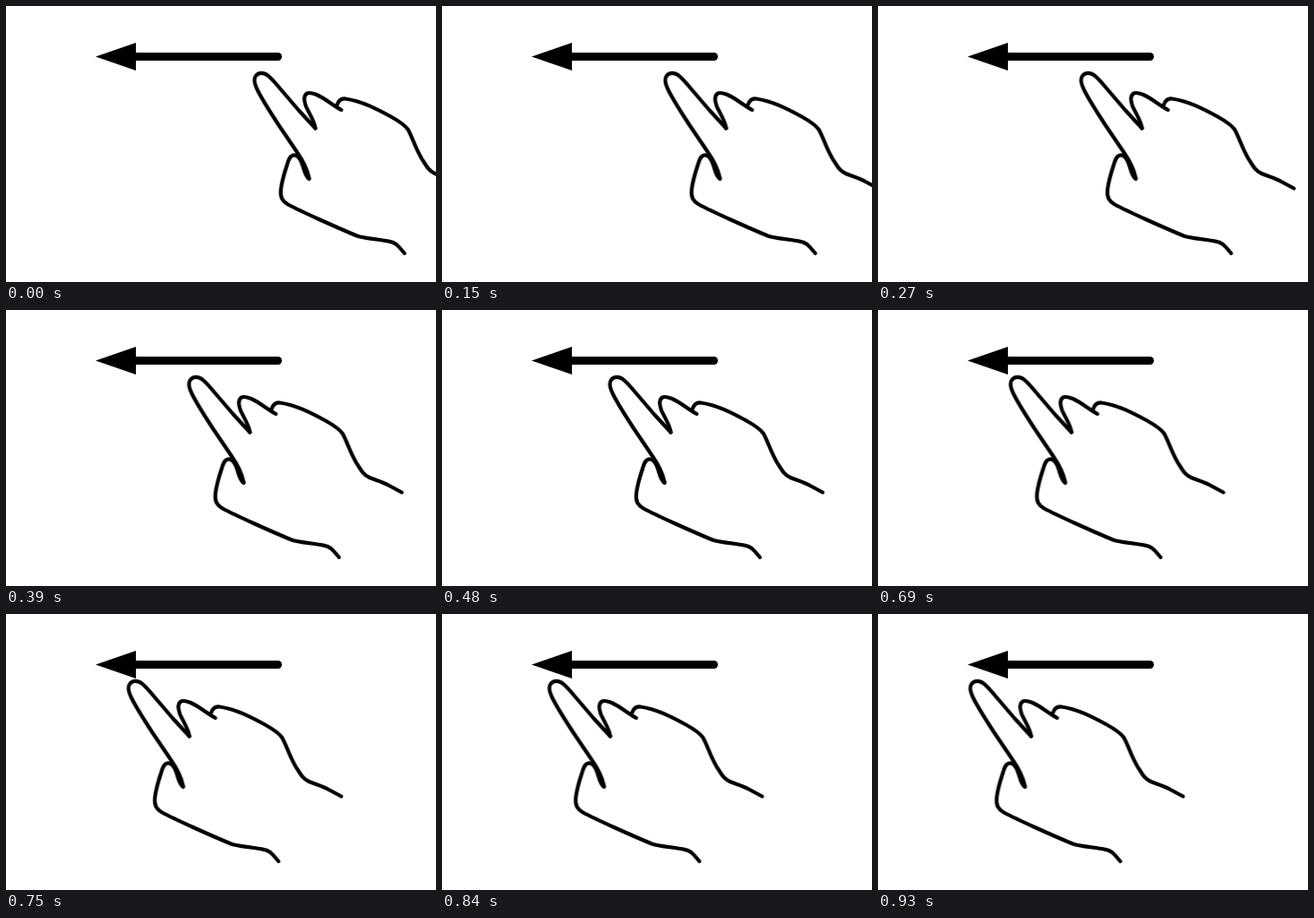
Write an HTML page that moves like this. It is 480 px wide and 308 px high and loops after 1030 ms.

```html
<!DOCTYPE html>
<html lang="en">
<head>
<meta charset="utf-8">
<title>Swipe left</title>
<style>
  html, body { margin: 0; width: 100%; height: 100%; overflow: hidden; background: #fff; }
  svg { display: block; width: 100%; height: 100%; }
  .bar { stroke: #000; stroke-width: 9; stroke-linecap: round; }
  .hand { fill: none; stroke: #000; stroke-width: 4.2; stroke-linecap: round; stroke-linejoin: round; }
</style>
</head>
<body>
<svg viewBox="0 0 480 308">
  <path d="M100 56.5L145 41V72Z"/>
  <path class="bar" d="M140 56.5H303.5"/>
  <g class="hand" id="hand">
    <!-- index finger -->
    <path d="M231.5 192C229 180 223.500 171 218 163L197 132C188 118 180 106 174 94C170.500 87 169.500 81 172 78C175 74 181 73.500 186 78C190 81.500 194.500 86.500 199 92L220 116.500L238.500 136.500"/>
    <!-- folded fingers -->
    <path d="M238.500 136.500C238 129 231 119 228 112C225.500 105 226 100 228.500 98C231 96 236 97.500 240 99C249 103 257 110 267.500 116"/>
    <!-- back of the hand and wrist -->
    <path d="M262.500 111C264 106 267 103 272 103.500C290 106 307 115 322 123C331 128 338 132 342 138C347 147 350 158 357 170C362 178 365 184 372 187C379 190 387 192 394 196L408 203.500"/>
    <!-- thumb and palm -->
    <path d="M231.500 193C227 190 226 183 224 177C221.500 170 218.500 166 214 166.500C210 167 208.500 172 207 177C204 186 201 196 200 205C199 214 202 218 208 221.500C222 229 262 247 285 256.500C294 259.500 303 259.500 314 261.500C323 262.500 328 264 332 269L338 276"/>
  </g>
</svg>
<script>
  const slide = x => `translate(${x}px, 0)`;
  const loop = 1030, travel = 930;

  document.getElementById('hand').animate([
    { transform: slide(106.8), easing: 'steps(31, end)' },
    { transform: slide(-67.5), offset: travel / loop },
    { transform: slide(-67.5) }
  ], { duration: loop, iterations: Infinity });
</script>
</body>
</html>
```
